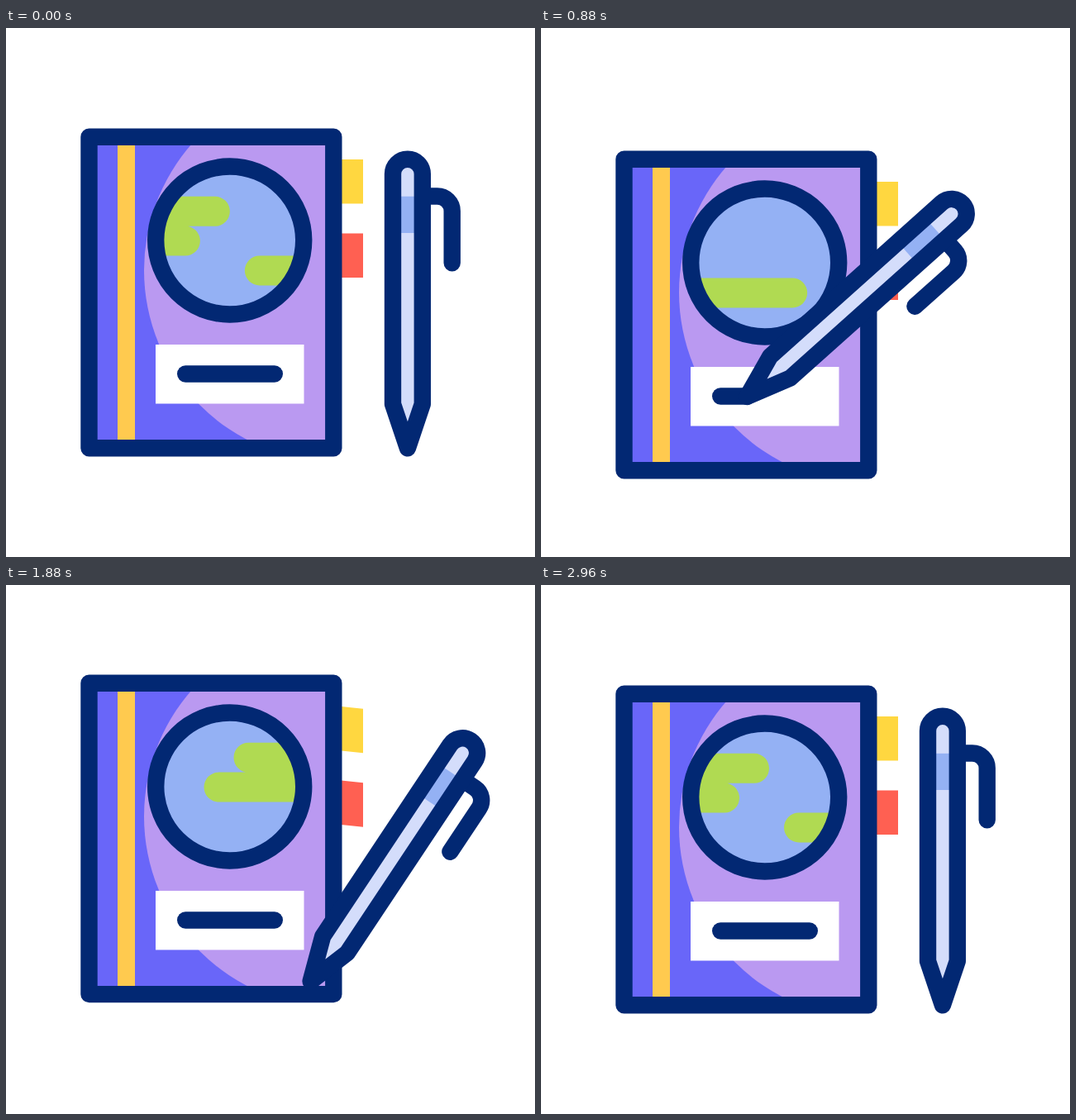
An HTML page for the animation above (3 s loop, 640 px wide and 640 px high).

```html
<!DOCTYPE html>
<html lang="en">
<head>
<meta charset="utf-8">
<title>Travel journal</title>
<style>
  html, body { margin: 0; width: 100%; height: 100%; overflow: hidden; background: #fff; }
  svg { display: block; width: 100%; height: 100%; }
  .ink { stroke: #022873; stroke-width: 20.4; stroke-linecap: round; stroke-linejoin: round; fill: none; }
  .land { stroke: #b0da52; stroke-width: 36; stroke-linecap: round; }
</style>
</head>
<body>
<svg viewBox="0 0 640 640">
  <defs>
    <clipPath id="cover"><rect x="100" y="132" width="296" height="376"/></clipPath>
    <clipPath id="globe"><circle cx="270.7" cy="257" r="88"/></clipPath>
    <g id="lands" class="land">
      <path d="M149.5 221.8H253M113.5 257.6H217M307 293.4H417.5"/>
    </g>
  </defs>
  <g id="book">
    <g id="tags">
      <path fill="#ffd740" d="M396 159h36v53.5h-36z"/>
      <path fill="#ff6052" d="M396 248.5h36v53.5h-36z"/>
    </g>
    <g clip-path="url(#cover)">
      <rect x="100" y="132" width="296" height="376" fill="#6966f9"/>
      <circle cx="398" cy="293" r="231" fill="#ba99f1"/>
      <rect x="135" y="132" width="21" height="376" fill="#ffca4f"/>
    </g>
    <rect class="ink" x="100.5" y="131.8" width="295.8" height="376.4"/>
    <circle cx="270.7" cy="257" r="89.5" fill="#94b1f4"/>
    <g clip-path="url(#globe)">
      <g id="map">
        <use href="#lands"/>
        <use href="#lands" x="386"/>
      </g>
    </g>
    <circle class="ink" cx="270.7" cy="257" r="89.5"/>
    <rect x="181" y="383" width="179.5" height="71.5" fill="#fff"/>
    <path id="line" class="ink"/>
  </g>
  <g id="pen">
    <path class="ink" d="M504 203.5H521.7a18 18 0 0 1 18 18V284.3"/>
    <path id="body" fill="#d4ddfb" d="M468 455V176.6a17.9 17.9 0 0 1 35.8 0V455L485.9 508.3Z"/>
    <rect x="470" y="203.8" width="32" height="44.2" fill="#94b1f4"/>
    <path class="ink" d="M468 455V176.6a17.9 17.9 0 0 1 35.8 0V455L485.9 508.3Z"/>
  </g>
</svg>
<script>
const LOOP = 3000, MAP_WIDTH = 386;
const LINE_START = 217.2, LINE_END = 324.8;
const PEN = { x: 485.9, y: 342.5 };          // pen centre at rest
const REACH = { x: -37.2, y: -7.1, turn: 48.2 }; // offset when touching the line
const $ = id => document.getElementById(id);
const set = (id, value, name = 'transform') => $(id).setAttribute(name, value);

// Value at time t through [time, value] keys, eased in and out.
function keys(t, ...list) {
  const i = list.findIndex(k => k[0] > t);
  if (i < 0) return list[list.length - 1][1];
  if (i === 0) return list[0][1];
  const [t0, a] = list[i - 1], [t1, b] = list[i];
  const u = (t - t0) / (t1 - t0);
  return a + (b - a) * u * u * (3 - 2 * u);
}

function draw(t) {
  const drop = keys(t, [0, 0], [400, 27], [1600, 27], [2040, -30], [2440, 12.5], [2760, 0]);
  set('book', `translate(0 ${drop})`);

  const flap = keys(t, [0, 0], [260, -.2], [520, 0], [1640, 0], [2080, .19], [2480, -.215], [2840, 0]);
  set('tags', `matrix(1 ${flap} 0 1 0 ${-396 * flap})`);

  set('map', `translate(${-MAP_WIDTH * t / LOOP} 0)`);

  const end = keys(t, [530, LINE_END], [1080, LINE_START], [1600, LINE_END]);
  set('line', `M${LINE_START} 418.5H${end}`, 'd');

  // The pen swings to the line and back on slightly curved paths.
  const p = keys(t, [0, 0], [345, 1], [1640, 1], [2300, 0]);
  const bend = 2 * p * (1 - p);
  const [bx, by] = t < 1000 ? [-18, -16] : [1, 9];
  const dx = REACH.x * p + bx * bend + end - LINE_END;
  const dy = REACH.y * p + by * bend;
  set('pen', `translate(${dx} ${dy}) rotate(${REACH.turn * p} ${PEN.x} ${PEN.y})`);
}

const start = performance.now();
function tick() {
  draw((performance.now() - start) % LOOP);
  requestAnimationFrame(tick);
}
tick();
</script>
</body>
</html>
```
